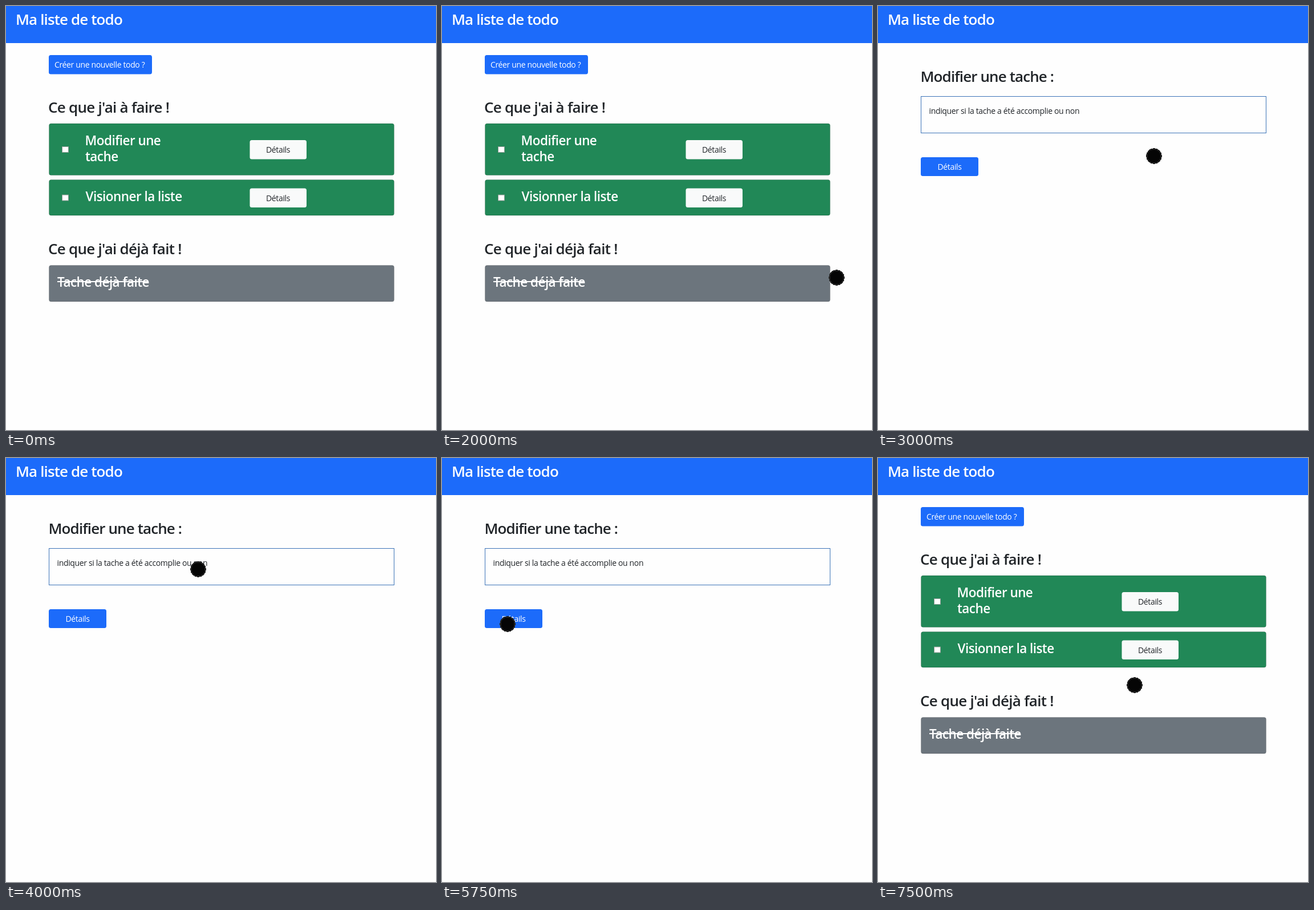
Animation of 754 by 743 pixels, one loop 8000 ms. Source, as an HTML page:

```html
<!DOCTYPE html>
<html lang="fr">
<head>
<meta charset="utf-8">
<title>Ma liste de todo</title>
<style>
  html, body { margin: 0; width: 100%; height: 100%; overflow: hidden; background: #fefefe; }
  svg { display: block; width: 754px; height: 743px; }
  text { font: 400 14px "Open Sans", "Noto Sans", sans-serif; letter-spacing: -.025em; fill: #212529; }
  .title { font-weight: 600; font-size: 26px; letter-spacing: -.028em; }
  .tight { letter-spacing: -.034em; }
  .task { font-weight: 600; font-size: 22.5px; letter-spacing: -.024em; }
  .light { fill: #fff; }
  .blue { fill: #1c6bfa; }
  .green { fill: #218857; }
  .grey { fill: #6c757d; }
  .pale { fill: #f9fafa; }
  .card { stroke: #000; stroke-opacity: .16; }
  .check { fill: #fff; stroke: #8b9a92; }
  .frame { fill: #fefefe; stroke: #3d74b8; }
</style>
</head>
<body>
<svg viewBox="0 0 754 743">
  <defs>
    <g id="controls">
      <rect class="check" x="98.5" y="11.5" width="11" height="10"/>
      <rect class="pale" x="427.5" width="99.5" height="33.5" rx="3.5"/>
      <text x="456" y="22">Détails</text>
    </g>
  </defs>

  <rect class="blue" width="754" height="65"/>
  <text class="title tight light" x="17" y="33">Ma liste de todo</text>

  <g id="list">
    <rect class="blue" x="75" y="86" width="181" height="33.5" rx="3.5"/>
    <text class="light" x="85" y="108">Créer une nouvelle todo ?</text>

    <text class="title" x="74" y="187">Ce que j'ai à faire !</text>
    <rect class="green card" x="75.5" y="206" width="605" height="90.5" rx="3.5"/>
    <text class="task light" x="138.5" y="243.5">Modifier une</text>
    <text class="task light" x="139" y="271.5">tache</text>
    <use href="#controls" y="235"/>

    <rect class="green card" x="75.5" y="304.5" width="605" height="62.5" rx="3.5"/>
    <text class="task light" x="139.5" y="342">Visionner la liste</text>
    <use href="#controls" y="319.5"/>

    <text class="title" x="74" y="435">Ce que j'ai déjà fait !</text>
    <rect class="grey card" x="75.5" y="454.5" width="605" height="63.5" rx="3.5"/>
    <text class="task light" x="90" y="491.5">Tache déjà faite</text>
    <rect class="light" x="90" y="482" width="160" height="2"/>
  </g>

  <g id="detail">
    <text class="title tight" x="74.5" y="133">Modifier une tache :</text>
    <rect class="frame" x="75.5" y="158.5" width="605" height="64"/>
    <text x="89.5" y="189">indiquer si la tache a été accomplie ou non</text>
    <rect class="blue" x="75" y="265" width="101" height="33" rx="3.5"/>
    <text class="light" x="104.5" y="287">Détails</text>
  </g>

  <g id="pointer" shape-rendering="crispEdges">
    <circle r="13.7" fill="#222"/>
    <circle r="11.5" fill="#050505"/>
  </g>
</svg>
<script>
  const LOOP = 8000, STEP = 250, APPEAR = 750;
  const even = t => t, early = t => t ** .4, slow = t => t ** 1.7, late = t => t ** 3;

  // Each leg bends because x and y ease differently; the pointer rests between legs
  const legs = [
    { from: 750, to: 1500, end: [320, 697], ease: [slow, slow] },
    { from: 1500, to: 2000, end: [692, 476], ease: [slow, late] },
    { from: 2000, to: 2250, end: [665, 262], ease: [even, even] },
    { from: 2250, to: 2750, end: [484, 263], ease: [early, even] },
    { from: 3500, to: 4250, end: [192, 128], ease: [slow, slow] },
    { from: 4250, to: 5000, end: [21, 205], ease: [early, slow] },
    { from: 5000, to: 5750, end: [115, 291], ease: [even, early] },
    { from: 6750, to: 7250, end: [450, 398], ease: [even, even] }
  ];

  function pointerAt(t) {
    let spot = [380, 729];
    for (const { from, to, end, ease } of legs) {
      const part = Math.min(1, Math.max(0, (t - from) / (to - from)));
      spot = spot.map((v, i) => v + (end[i] - v) * ease[i](part));
    }
    return spot;
  }

  const [list, detail, pointer] = ["list", "detail", "pointer"].map(id => document.getElementById(id));
  const show = (el, on) => el.setAttribute("display", on ? "inline" : "none");

  function draw(now) {
    const t = Math.floor(now % LOOP / STEP) * STEP;
    const open = t >= 3000 && t < 6500;
    show(list, !open);
    show(detail, open);
    show(pointer, t >= APPEAR);
    pointer.setAttribute("transform", `translate(${pointerAt(t).map(Math.round)})`);
  }

  function tick() {
    draw(performance.now());
    requestAnimationFrame(tick);
  }
  tick();
</script>
</body>
</html>
```
